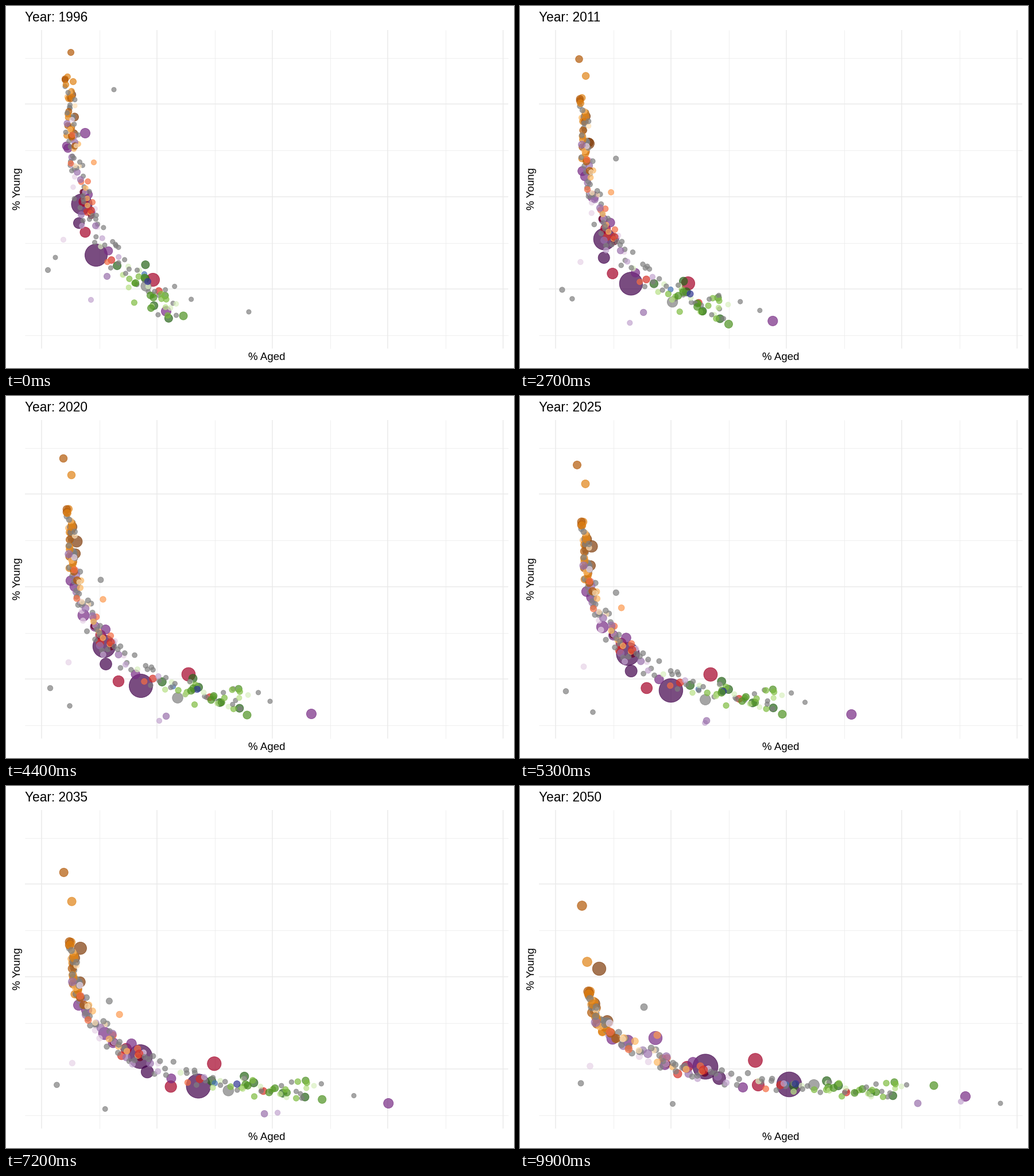
A matplotlib script for the animation above (10 s loop, 885 px wide and 632 px high).

```python
import numpy as np
import matplotlib.pyplot as plt
from matplotlib.animation import FuncAnimation

W, H, DPI = 885, 632, 72
LEFT, RIGHT, TOP, BOTTOM = 33, 875, 42, 598
FRAMES = 100
T = np.linspace(0, 1, FRAMES)

GREY = "#7f7f7f"
UMBER, RUST, ORANGE, APRICOT, CREAM = "#7f3b08", "#b35806", "#e08214", "#fdb863", "#fee0b6"
WINE, CRIMSON, RED, CORAL, PEACH = "#67001f", "#a50026", "#d73027", "#f46d43", "#fd9a50"
PLUM, VIOLET, MAUVE, LILAC, MIST = "#40004b", "#762a83", "#9970ab", "#c2a5cf", "#e7d4e8"
PINE, GREEN, LEAF, LIME, PALE = "#276419", "#4d9221", "#7fbc41", "#b8e186", "#d9f0c0"
NAVY, BLUE = "#313695", "#4575b4"

rng = np.random.default_rng(7)
bubbles = []


def add(color, r, path):
    growth = 0.45 * np.clip((535 - path[0, 1]) / 400, 0, 1)  # young countries grow most
    bubbles.append((color, r, r * (1 + growth * T), path))


def landmark(color, r, start, middle, end):
    """A distinct bubble on a parabolic path through three points."""
    curve = np.polyfit([0, 4 / 9, 1], [start, middle, end], 2)
    add(color, r, np.vander(T, 3) @ curve)


def crest(s):
    """Centre of the crowd over time, from youngest (s=0) to oldest (s=1)."""
    x = 112 + 12 * T ** 3 + (187 + 355 * T ** 1.3) * s ** (2.9 - 1.05 * T ** 2)
    y = 530 - (390 - 225 * T ** 1.5) * (1 - s) ** (1 + T)
    return np.column_stack([x, y])


def crowd(color, n, lo, hi, r):
    """n bubbles spread along part of the crest, their scatter shrinking with time."""
    for s in np.linspace(lo, hi, n) + rng.uniform(-0.5, 0.5, n) * (hi - lo) / n:
        s = np.clip(s, 0, 1)
        scatter = rng.normal(size=2).clip(-1.8, 1.8) * (5 + 14 * s ** 2, 16 - 3 * s)
        add(color, r, crest(s) + scatter * (1 - 0.45 * T)[:, None])


landmark(PLUM, 20, (157, 435), (235, 506), (469, 521))
landmark(PLUM, 18.5, (132, 346), (171, 437), (323, 490))
landmark(PLUM, 10, (127, 379), (174, 468), (347, 510))
landmark(VIOLET, 9, (138, 222), (135, 383), (236, 440))
landmark(VIOLET, 9, (279, 533), (532, 555), (776, 542))
landmark(CRIMSON, 12, (256, 478), (318, 486), (410, 479))
landmark(CRIMSON, 9.5, (138, 395), (196, 498), (415, 522))
landmark(GREY, 9.5, (244, 489), (299, 527), (512, 522))
landmark(UMBER, 9, (117, 224), (123, 254), (138, 319))
landmark(RUST, 6, (113, 81), (100, 109), (108, 209))
landmark(ORANGE, 6, (117, 132), (114, 138), (117, 307))
landmark(PEACH, 5, (153, 273), (169, 355), (239, 435))
landmark(GREEN, 7.5, (309, 541), (420, 557), (721, 523))
landmark(NAVY, 6, (247, 481), (333, 512), (480, 520))
landmark(BLUE, 5, (241, 468), (291, 507), (464, 521))
landmark(MAUVE, 6, (176, 472), (279, 559), (693, 554))
landmark(LILAC, 5, (148, 513), (267, 567), (768, 551))
landmark(MIST, 5, (100, 408), (109, 465), (122, 489))
landmark(GREY, 5, (73, 461), (77, 510), (106, 519))
landmark(GREY, 4.5, (86, 439), (111, 541), (266, 555))
landmark(GREY, 4.5, (423, 534), (460, 533), (837, 554))
landmark(GREY, 4.5, (188, 146), (165, 321), (216, 386))

crowd(GREY, 70, 0, 1, 4.5)
crowd(ORANGE, 10, 0, 0.2, 5.7)
crowd(RUST, 8, 0, 0.25, 6)
crowd(UMBER, 2, 0.08, 0.2, 7.5)
crowd(APRICOT, 10, 0, 0.6, 4.9)
crowd(CREAM, 6, 0.05, 0.45, 4.3)
crowd(CORAL, 7, 0.1, 0.7, 5.3)
crowd(RED, 4, 0.5, 0.85, 6.5)
crowd(CRIMSON, 1, 0.5, 0.6, 8.5)
crowd(WINE, 2, 0.45, 0.6, 5.5)
crowd(VIOLET, 6, 0.25, 0.7, 7.8)
crowd(MAUVE, 7, 0.15, 0.6, 6)
crowd(LILAC, 6, 0.25, 0.75, 5)
crowd(MIST, 5, 0.25, 0.65, 4.7)
crowd(PINE, 5, 0.8, 1, 7.5)
crowd(GREEN, 6, 0.85, 1, 6.5)
crowd(LEAF, 9, 0.85, 1, 5.5)
crowd(LIME, 4, 0.8, 1, 5)
crowd(PALE, 6, 0.75, 1, 4.8)

rng.shuffle(bubbles)
bubbles.sort(key=lambda b: -max(b[1], 7))  # big ones go below
colors, _, radii, paths = zip(*bubbles)
RADII, PATHS = np.stack(radii), np.stack(paths)

plt.rcParams["font.family"] = "Liberation Sans"
fig = plt.figure(figsize=(W / DPI, H / DPI), dpi=DPI, facecolor="white")
ax = fig.add_axes([0, 0, 1, 1])
ax.set(xlim=(0, W), ylim=(H, 0))
ax.axis("off")

for x0, y0, lw in [(162.8, 91, 0.75), (62.3, 171.2, 1.5)]:
    style = dict(color="#ebebeb", lw=lw, zorder=1)
    ax.vlines(np.arange(x0, RIGHT, 200.9), TOP, BOTTOM, **style)
    ax.hlines(np.arange(y0, BOTTOM, 161.4), LEFT, RIGHT, **style)

title = ax.text(LEFT, 27, "", fontsize=22.8)
ax.text(454, 617.5, "% Aged", fontsize=18.8, ha="center")
ax.text(24.7, 319.3, "% Young", fontsize=18.8, rotation=90, ha="center", va="baseline",
        rotation_mode="anchor")
dots = ax.scatter(*PATHS[:, 0].T, c=colors, alpha=0.7, linewidths=0.9, zorder=2)


def update(i):
    title.set_text(f"Year: {1996 + round(54 * T[i])}")
    dots.set_offsets(PATHS[:, i])
    dots.set_sizes((2 * RADII[:, i] - 0.9) ** 2)
    return dots, title


anim = FuncAnimation(fig, update, frames=FRAMES, interval=100, repeat=True, repeat_delay=0)
plt.show()
```
